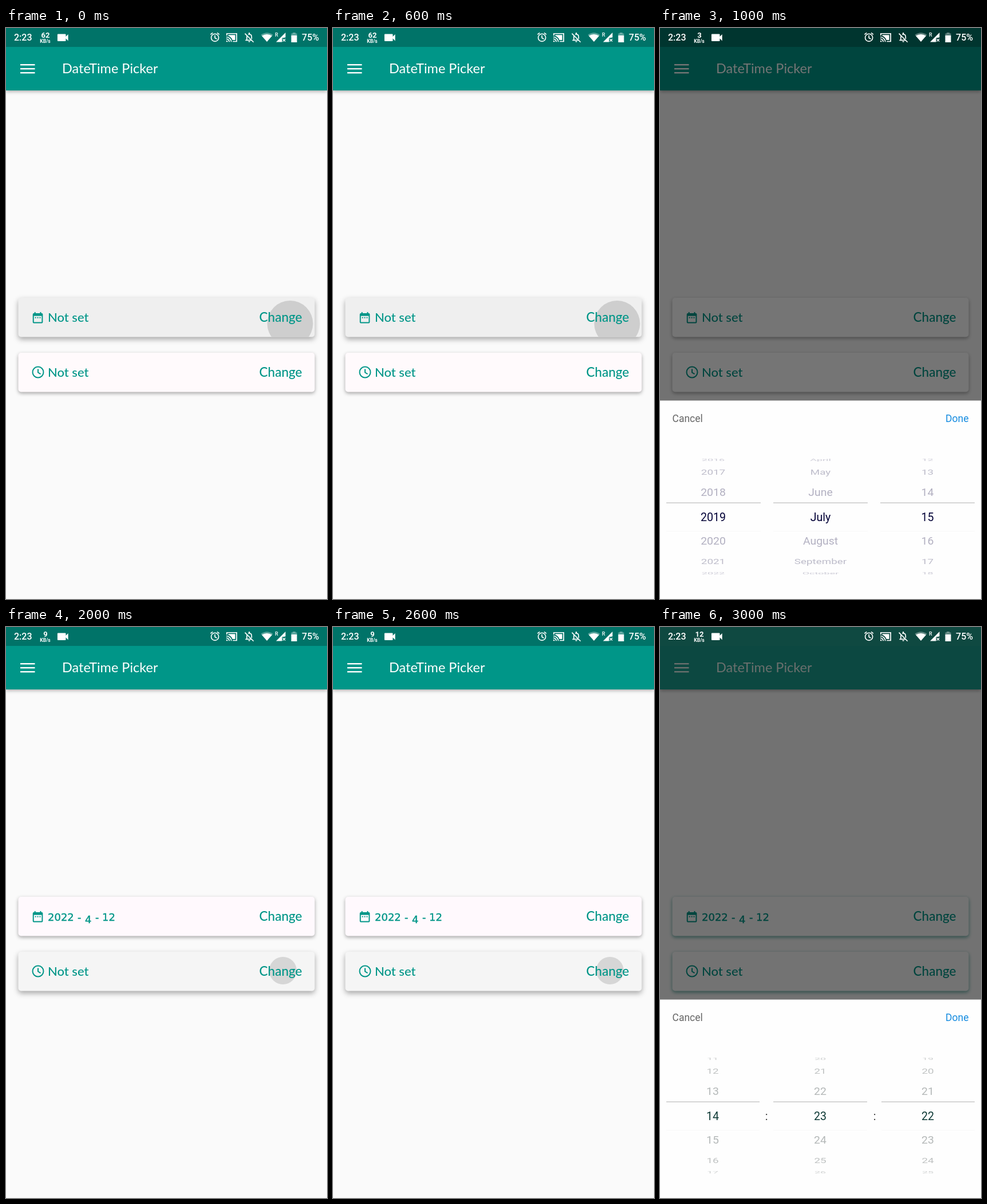
Write an HTML page with a canvas that moves like this. It is 561 px wide and 997 px high and loops after 4000 ms.

```html
<!DOCTYPE html>
<html lang="en">
<head>
<meta charset="utf-8">
<title>Date and time picker</title>
<style>
html, body { margin: 0; width: 100%; height: 100%; overflow: hidden; background: #fafafa; }
canvas { display: block; width: 561px; height: 997px; }
</style>
</head>
<body>
<canvas id="stage" width="561" height="997"></canvas>
<script>
const ctx = document.getElementById('stage').getContext('2d');
const W = 561, H = 997, HOLD = 1000;
const TEAL = '#009688';
const UI = 'Lato, "Open Sans", sans-serif';
const ROBOTO = 'Roboto, Arial, sans-serif';
const MONTHS = ['April', 'May', 'June', 'July', 'August', 'September', 'October'];

const dateSheet = {
  lines: [[11, 176], [198, 363], [385, 550]],
  columns: [[93, k => 2019 + k], [280.5, k => MONTHS[k + 3]], [467.5, k => 15 + k]],
  ink: '#040338', muted: '#aeacbe', colons: []
};
const timeSheet = {
  lines: [[11, 174], [198, 362], [387, 550]],
  columns: [[92, k => 14 + k], [280, k => 23 + k], [468, k => 22 + k]],
  ink: '#0d3935', muted: '#b0b4b4', colons: [186, 375]
};

const scenes = [
  { speed: 62, bar: '#007368', cards: ['#efefef', '#fffafc'], press: { card: 0, x: 496.5, y: 516, r: 40, fill: '#cecece' } },
  { speed: 3, bar: '#00352f', cards: ['#fff', '#fff'], sheet: dateSheet },
  { speed: 9, bar: '#007368', cards: ['#fff9fd', '#f5f5f5'], dated: true, press: { card: 1, x: 484, y: 600, r: 24, fill: '#d6d6d6' } },
  { speed: 12, bar: '#0f4941', cards: ['#fbfbfb', '#fbfbfb'], dated: true, sheet: timeSheet, tint: '#0f4941' }
];

function rect(x, y, w, h, fill) {
  ctx.fillStyle = fill;
  ctx.fillRect(x, y, w, h);
}

function label(str, x, y, font, fill, align = 'left') {
  ctx.font = font;
  ctx.fillStyle = fill;
  ctx.textAlign = align;
  ctx.fillText(str, x, y);
}

function disc(x, y, r, fill) {
  ctx.fillStyle = fill;
  ctx.beginPath();
  ctx.arc(x, y, r, 0, Math.PI * 2);
  ctx.fill();
}

// Icons are drawn on a 24 unit grid
function icon(x, y, scale, color, { fill, stroke, width = 2 }) {
  ctx.save();
  ctx.translate(x, y);
  ctx.scale(scale, scale);
  ctx.fillStyle = ctx.strokeStyle = color;
  ctx.lineWidth = width;
  if (fill) ctx.fill(new Path2D(fill), 'evenodd');
  if (stroke) ctx.stroke(new Path2D(stroke));
  ctx.restore();
}

const ICONS = {
  alarm: {
    fill: 'M22 5.7l-4.6-3.9-1.3 1.5 4.6 3.9zM7.9 3.4L6.6 1.9 2 5.7l1.3 1.5z',
    stroke: 'M20 13a8 8 0 1 1-16 0a8 8 0 1 1 16 0M12 8v5.5l4 2.4'
  },
  cast: {
    fill: 'M1 18v3h3a3 3 0 0 0-3-3zM5 7v1.6c4 1.3 7 4.4 8.4 8.4H19V7z',
    stroke: 'M2 8V4h20v16h-8M1 15a6 6 0 0 1 6 6M1 11a10 10 0 0 1 10 10'
  },
  bellOff: {
    fill: 'M10 20h4a2 2 0 0 1-4 0zM10.5 5V3.5a1.5 1.5 0 0 1 3 0V5z',
    stroke: 'M4 18h14M7 18v-7q0-2 1-3.5M10 6q7-1.500 7 5v4M3 4L21 22'
  },
  video: { fill: 'M4 6h12a1 1 0 0 1 1 1v3.500l4-4v11l-4-4V17a1 1 0 0 1-1 1H4a1 1 0 0 1-1-1V7a1 1 0 0 1 1-1z' },
  calendar: {
    fill: 'M19 4h-1V2h-2v2H8V2H6v2H5a2 2 0 0 0-2 2v14a2 2 0 0 0 2 2h14a2 2 0 0 0 2-2V6a2 2 0 0 0-2-2zM19 20H5V9h14zM7 11h2v2H7zM11 11h2v2h-2zM15 11h2v2h-2z'
  },
  clock: { stroke: 'M21.500 12a9.500 9.500 0 1 1-19 0a9.500 9.500 0 1 1 19 0M12 6.500v6l4.500 2.700' }
};

function statusBar(scene) {
  const white = '#fff', faint = 'rgba(255,255,255,.35)';
  rect(0, 0, W, 33, scene.bar);
  label('2:23', 14, 22, `500 16px ${ROBOTO}`, white);
  label(scene.speed, 69, 17, `bold 13px ${ROBOTO}`, white, 'center');
  label('KB/s', 68.5, 26, `bold 8.500px ${ROBOTO}`, white, 'center');
  icon(86.800, 4.200, 1.040, white, ICONS.video);
  icon(355.300, 6.200, 0.820, white, ICONS.alarm);
  icon(384.200, 6.300, 0.860, white, ICONS.cast);
  icon(415, 6.300, 0.840, white, ICONS.bellOff);
  icon(0, 0, 1, faint, { fill: 'M456 24L445.500 12Q456 4.500 466.500 12z' });
  icon(0, 0, 1, white, { fill: 'M456 24L447 13.700Q456 8.500 465 13.700z' });
  label('R', 470, 15, `500 9px ${ROBOTO}`, white);
  icon(0, 0, 1, white, {
    fill: 'M472 24.500L488.500 8v8.500l-6 1v7z',
    stroke: 'M483.700 19l4.500 4.500m0-4.500l-4.500 4.500', width: 1.3
  });
  rect(501, 8, 5, 2, faint);
  rect(498.500, 9.500, 10, 3.500, faint);
  rect(498.500, 13, 10, 12, white);
  label('75%', 547, 22, `500 16px ${ROBOTO}`, white, 'right');
}

function appBar() {
  ctx.save();
  ctx.shadowColor = 'rgba(0,0,0,.32)';
  ctx.shadowBlur = 6;
  ctx.shadowOffsetY = 2;
  rect(0, 30, W, 79, TEAL);
  ctx.restore();
  for (let i = 0; i < 3; i++) rect(25, 63 + i * 7, 25.500, 2.400, '#fff');
  label('DateTime Picker', 98, 79, `23.500px ${UI}`, '#fff');
}

function card(index, scene) {
  const y = index ? 567 : 471, base = y + 42, press = scene.press;
  const pressed = press && press.card === index;
  const box = new Path2D();
  box.roundRect(21.500, y, 518, 68.500, 5);

  ctx.save();
  ctx.shadowColor = scene.tint ? 'rgba(0,120,105,.6)' : 'rgba(0,0,0,.34)';
  ctx.shadowBlur = pressed ? 10 : 6;
  ctx.shadowOffsetY = pressed ? 4 : 2.5;
  ctx.fillStyle = scene.cards[index];
  ctx.fill(box);
  ctx.restore();

  if (pressed) {
    ctx.save();
    ctx.clip(box);
    disc(press.x, press.y, press.r, press.fill);
    ctx.restore();
  }

  if (index) icon(44, 589, 1, TEAL, ICONS.clock);
  else icon(43.800, 494, 0.980, TEAL, ICONS.calendar);

  const font = `500 22px ${UI}`;
  if (!index && scene.dated) dateText(base);
  else label('Not set', 73, base - 0.300, font, TEAL);
  label('Change', 517.500, base - 0.300, `500 22.500px ${UI}`, TEAL, 'right');
}

// Old-style figures: low, wide digits with a hanging four
function dateText(base) {
  const font = '18px "DejaVu Sans", sans-serif';
  ctx.strokeStyle = TEAL;
  ctx.lineWidth = 0.4;
  for (const [str, x, drop] of [['2022', 73, 0], ['-', 125, 0], ['4', 138, 4], ['-', 156, 0], ['12', 168, 0]]) {
    label(str, x, base + drop, font, TEAL);
    ctx.strokeText(str, x, base + drop);
  }
}

function wheel(x, value, sheet) {
  const step = 24.3 * Math.PI / 180, radius = 103.5;
  for (let k = -3; k <= 3; k++) {
    const squash = Math.cos(k * step);
    const grow = 1 - 0.115 * (1 - squash);
    ctx.save();
    ctx.translate(x, 853.5 + radius * Math.sin(k * step));
    ctx.scale(grow, grow * squash);
    ctx.globalAlpha = k ? 0.45 + 0.55 * squash : 1;
    label(value(k), 0, 7, `19.600px ${ROBOTO}`, k ? sheet.muted : sheet.ink, 'center');
    ctx.restore();
  }
}

function bottomSheet(sheet) {
  rect(0, 650.500, W, H - 650.500, '#fefefe');
  label('Cancel', 21.500, 687.500, `17.500px ${ROBOTO}`, '#666');
  label('Done', 539.500, 687.500, `17.500px ${ROBOTO}`, '#168ce0', 'right');
  for (const [a, b] of sheet.lines) {
    rect(a, 828.500, b - a, 1.2, '#bdbdbd');
    rect(a, 878, b - a, 1, '#f8f8f8');
  }
  for (const [x, value] of sheet.columns) wheel(x, value, sheet);
  for (const x of sheet.colons) label(':', x, 860.500, `19.600px ${ROBOTO}`, '#333', 'center');
}

function draw(scene) {
  rect(0, 0, W, H, '#fafafa');
  appBar();
  card(0, scene);
  card(1, scene);
  if (scene.sheet) {
    rect(0, 0, W, H, 'rgba(0,0,0,.54)');
    if (scene.tint) rect(0, 33, W, 76, 'rgba(60,85,75,.2)');
    bottomSheet(scene.sheet);
  }
  statusBar(scene);
}

const start = performance.now();
function tick() {
  const t = performance.now() - start;
  draw(scenes[Math.floor(t / HOLD) % scenes.length]);
  requestAnimationFrame(tick);
}
tick();
</script>
</body>
</html>
```
